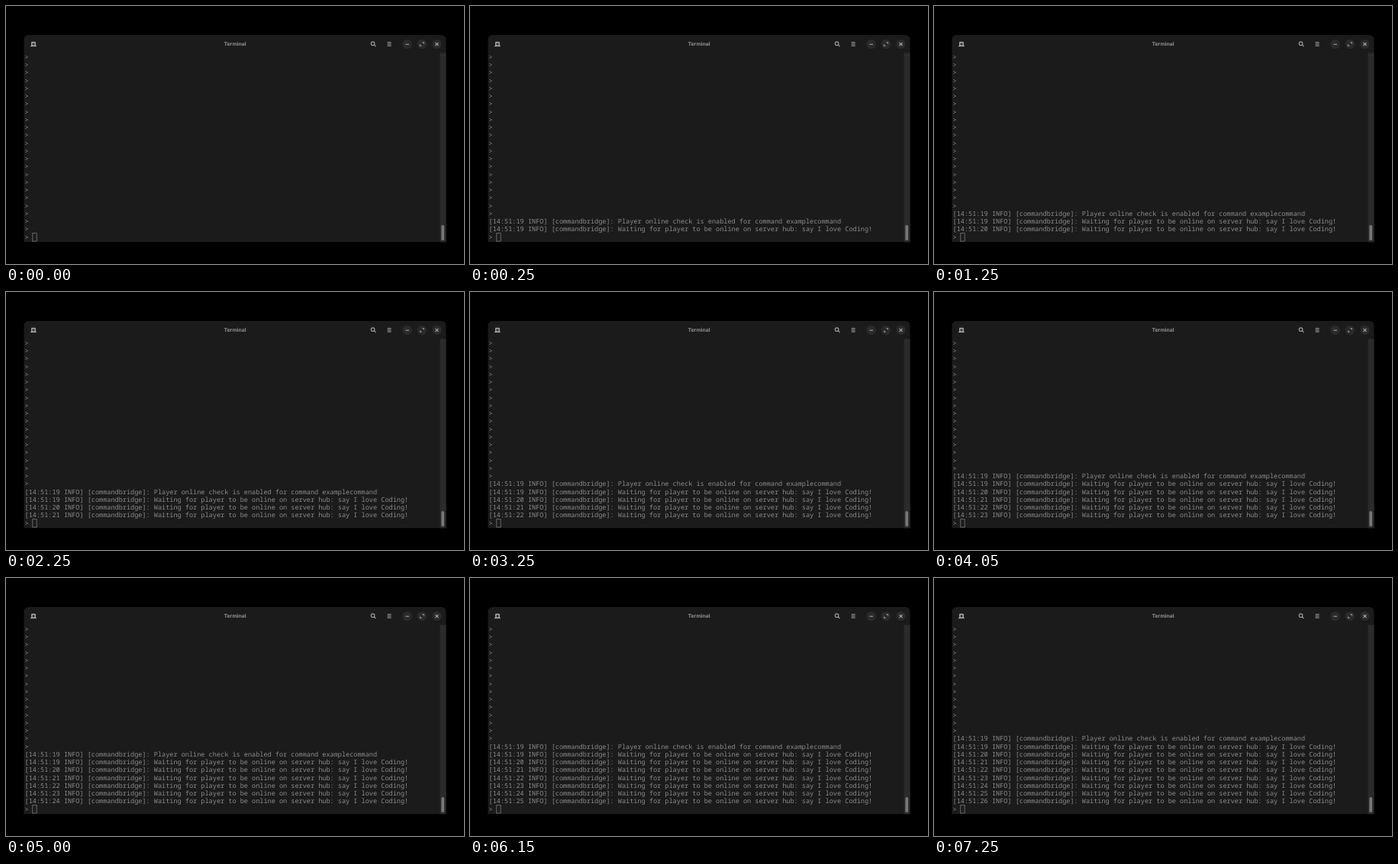
Animation, 600 px wide and 338 px high, one loop 8 s. Source, as an HTML page with a canvas:

```html
<!DOCTYPE html>
<html lang="en">
<head>
<meta charset="utf-8">
<title>Terminal</title>
<style>
html, body { margin: 0; width: 100%; height: 100%; overflow: hidden; background: #000; }
canvas { display: block; width: 600px; height: 338px; }
</style>
</head>
<body>
<canvas id="stage"></canvas>
<script>
const canvas = document.getElementById('stage');
const ctx = canvas.getContext('2d');
const scale = window.devicePixelRatio || 1;
canvas.width = 600 * scale;
canvas.height = 338 * scale;

const LOOP = 8000;
const ROWS = 24, PITCH = 10.25, LEFT = 24.6, BASE = 69.9;
const INK = '#8c8c8c', ICON = '#a0a0a0', PANEL = '#1b1b1b';

// A new line is logged at each of these times.
const arrivals = [250, 1250, 2250, 3250, 4050, 5000, 6150, 7250];

const entry = (second, message) => `[14:51:${second} INFO] [commandbridge]: ${message}`;
const log = [entry(19, 'Player online check is enabled for command examplecommand')];
arrivals.forEach((_, i) =>
  log.push(entry(19 + i, 'Waiting for player to be online on server hub: say I love Coding!')));

function box(x, y, w, h, radius, fill) {
  ctx.fillStyle = fill;
  ctx.beginPath();
  ctx.roundRect(x, y, w, h, radius);
  ctx.fill();
}

function line(...points) {
  ctx.beginPath();
  points.forEach(([x, y]) => ctx.lineTo(x, y));
  ctx.stroke();
}

function disc(x, y, r, fill) {
  ctx.fillStyle = fill;
  ctx.beginPath();
  ctx.arc(x, y, r, 0, 7);
  ctx.fill();
}

function drawIcons() {
  // New tab: a solid tab with a plus cut out
  box(33, 46.8, 6, 6.2, [1, 1, 0, 0], ICON);
  box(32, 52, 8, 1.1, 0, ICON);
  box(34.3, 49.3, 3.4, 1.2, 0, PANEL);
  box(35.4, 48.2, 1.2, 3.4, 0, PANEL);

  ctx.strokeStyle = ICON;
  ctx.lineWidth = 1.1;

  // Search
  ctx.beginPath();
  ctx.arc(480.6, 49.2, 2.3, 0, 7);
  ctx.stroke();
  line([482.3, 50.9], [484.5, 53.1]);

  // Menu
  for (const y of [47.7, 49.9, 52.1]) line([499.6, y], [504.6, y]);

  // Window buttons
  for (const x of [525.6, 545, 564.5]) disc(x, 50, 6.2, '#2a2a2a');
  line([523.3, 50.2], [527.9, 50.2]);
  line([545.5, 47.7], [547.4, 47.7], [547.4, 49.6]);
  line([542.6, 50.4], [542.6, 52.3], [544.5, 52.3]);
  line([562.5, 48], [566.5, 52]);
  line([566.5, 48], [562.5, 52]);
}

function drawWindow() {
  ctx.fillStyle = '#000';
  ctx.fillRect(0, 0, 600, 338);
  box(23.5, 38, 553, 271.3, [6, 6, 0, 0], PANEL);
  box(568.5, 61.5, 8, 247.8, 0, '#2b2b2b');
  box(570.3, 287, 3.8, 20.2, 1.9, '#767676');
  drawIcons();
  ctx.fillStyle = '#929292';
  ctx.font = '700 6.8px Inter, sans-serif';
  ctx.textAlign = 'center';
  ctx.fillText('Terminal', 300, 52.3);
}

function drawTerminal(time) {
  const waiting = arrivals.filter(t => time >= t).length;
  const count = waiting ? waiting + 1 : 0;
  const first = ROWS - 1 - count;
  ctx.font = '8.555px "Noto Sans Mono", monospace';
  ctx.textAlign = 'left';
  ctx.fillStyle = INK;
  for (let row = 0; row < ROWS; row++) {
    const logged = row >= first && row < ROWS - 1;
    ctx.fillText(logged ? log[row - first] : '>', LEFT, BASE + row * PITCH);
  }
  ctx.strokeStyle = '#7c7c7c';
  ctx.lineWidth = 0.8;
  ctx.strokeRect(34.8, 297.7, 5.4, 10.4);
}

function draw(time) {
  ctx.setTransform(scale, 0, 0, scale, 0, 0);
  ctx.textRendering = 'geometricPrecision';
  drawWindow();
  drawTerminal(time);
}

const start = performance.now();
function tick() {
  draw((performance.now() - start) % LOOP);
  requestAnimationFrame(tick);
}
tick();
</script>
</body>
</html>
```
